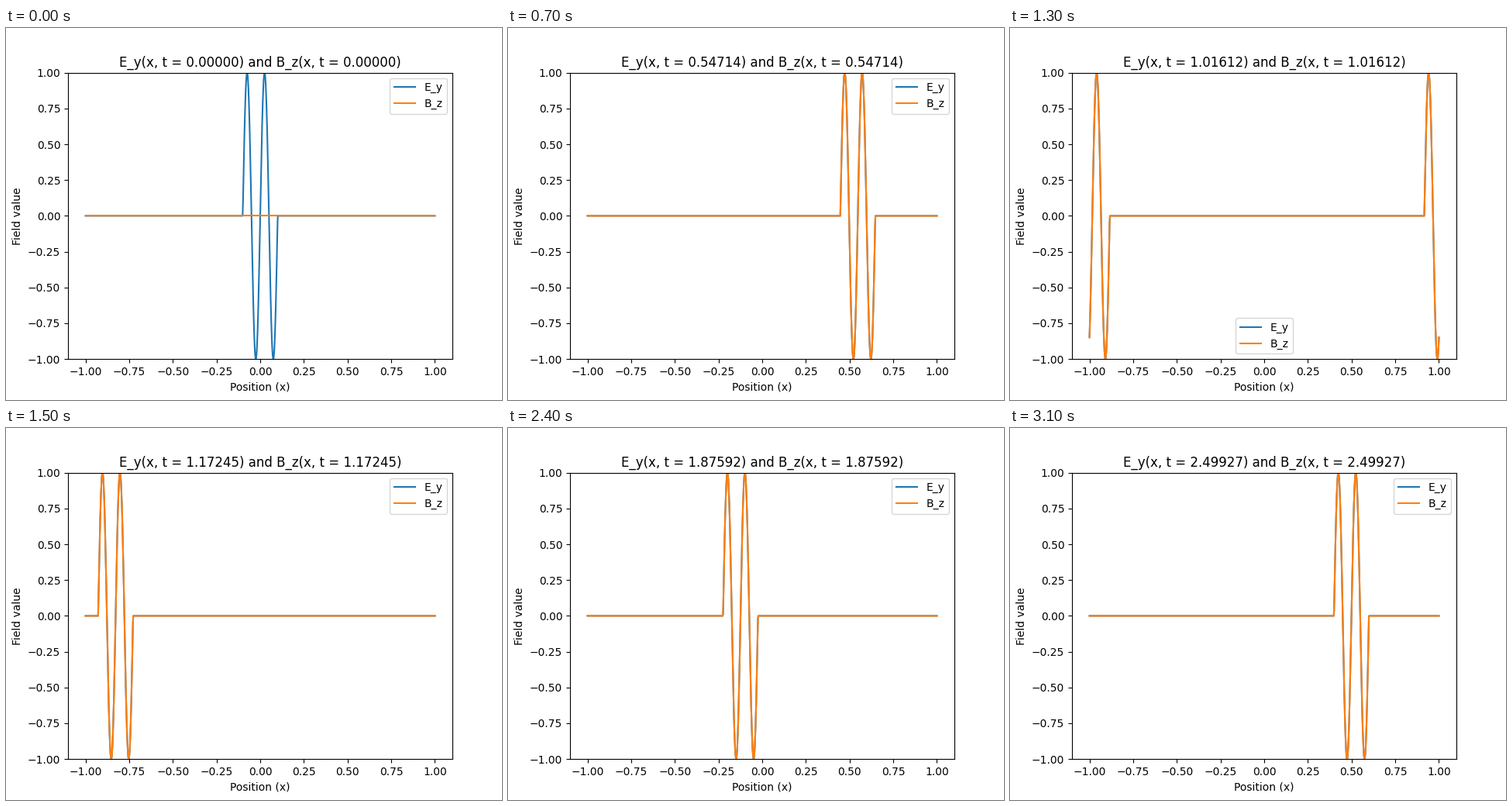
These frames come from a looping animation (640x480 px, 3200 ms). A matplotlib script:

```python
import numpy as np
import matplotlib.pyplot as plt
from matplotlib.animation import FuncAnimation

FRAMES = 32
INTERVAL = 100
DT = 2 / 1023.5      # time step of the field
STRIDE = 40          # steps between two pictures
LAST_STEP = 1279     # the final picture shows the end state
HALF_WIDTH = 0.1

x = np.linspace(-1, 1, 1024)


def pulse(t):
    """Two sine periods travelling right through a periodic domain."""
    u = (x - t + 1) % 2 - 1
    return np.where(np.abs(u) <= HALF_WIDTH, np.sin(20 * np.pi * u), 0)


fig, ax = plt.subplots(figsize=(6.4, 4.8), dpi=100)
e_line, = ax.plot(x, pulse(0), label="E_y")
b_line, = ax.plot(x, 0 * x, label="B_z")
ax.set_xlim(-1.1, 1.1)
ax.set_ylim(-1, 1)
ax.set_xlabel("Position (x)")
ax.set_ylabel("Field value")
ax.legend(loc="best")


def update(i):
    step = LAST_STEP if i == FRAMES - 1 else i * STRIDE
    t = step * DT
    field = pulse(t)
    e_line.set_ydata(field)
    b_line.set_ydata(field if step else 0 * x)
    ax.set_title(f"E_y(x, t = {t:.5f}) and B_z(x, t = {t:.5f})")
    return e_line, b_line


anim = FuncAnimation(fig, update, frames=FRAMES, interval=INTERVAL,
                     repeat=True, repeat_delay=0)
plt.show()
```
